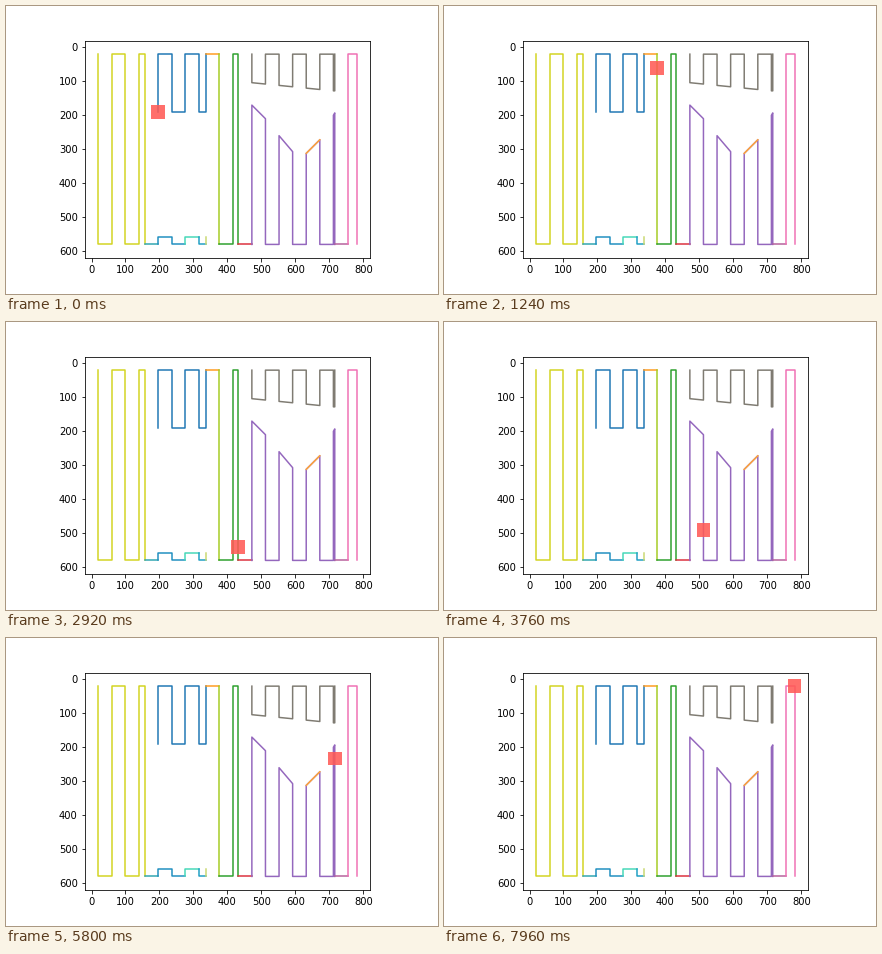
These frames come from a looping animation (432x288 px, 8 s). A matplotlib script:

```python
import math

import matplotlib.pyplot as plt
from matplotlib.animation import FuncAnimation
from matplotlib.patches import Rectangle

TOP, BOTTOM = 20, 580
STEP = 40      # largest move per frame along either axis
SIZE = 40      # side of the robot
FRAMES, INTERVAL = 200, 40


def zigzag(xs, start, end):
    """Vertical sweeps at each x, alternating between two heights."""
    pts = []
    for i, x in enumerate(xs):
        a, b = (start, end) if i % 2 == 0 else (end, start)
        pts += [(x, a), (x, b)]
    return pts


def walk(points):
    """Split every leg into steps; the last step of a leg may be shorter."""
    out = [points[0]]
    for (x0, y0), (x1, y1) in zip(points, points[1:]):
        span = max(abs(x1 - x0), abs(y1 - y0))
        if span == 0:
            out.append((x1, y1))
        for k in range(1, math.ceil(span / STEP) + 1):
            t = min(1, k * STEP / span)
            out.append((x0 + (x1 - x0) * t, y0 + (y1 - y0) * t))
    return out


left = zigzag([20, 60, 100, 140, 156], TOP, BOTTOM)
upper = zigzag([196, 236, 276, 316, 336], 190, TOP)
lower = zigzag([196, 236, 276, 316, 336], BOTTOM, 557)
middle = zigzag([376, 416, 432], TOP, BOTTOM)
slopes = [(472, BOTTOM), (472, 170), (512, 210), (512, BOTTOM),
          (552, BOTTOM), (552, 260), (592, 307), (592, BOTTOM),
          (632, BOTTOM), (632, 312), (672, 272), (672, BOTTOM),
          (712, BOTTOM), (712, 200), (716, 193), (716, BOTTOM)]
ceiling = [(472, TOP), (472, 104), (512, 108), (512, TOP),
           (552, TOP), (552, 112), (592, 116), (592, TOP),
           (632, TOP), (632, 120), (672, 124), (672, TOP),
           (712, TOP), (712, 128), (716, 128), (716, TOP)]
right = zigzag([756, 780], BOTTOM, TOP)

route = upper + middle + slopes + right + [(780, BOTTOM), (780, TOP)]
spots = walk(route)

lines = [
    (left, "#d3d420"),
    ([left[-1], lower[0]], "#2fa5b0"),
    (lower[:5], "#1f8fc0"),
    (lower[4:7], "#45d8b8"),
    (lower[6:9], "#1f9fc4"),
    (lower[8:], "#c9d870"),
    (upper, "#1f77b4"),
    ([upper[-1], middle[0]], "#ff9a1e"),
    (middle[:2], "#a5cc22"),
    (middle[1:], "#2ca02c"),
    ([middle[-1], slopes[0]], "#dc2f3c"),
    (slopes, "#9467bd"),
    (slopes[9:11], "#ffa53a"),
    ([slopes[-1], right[0]], "#b5609a"),
    (ceiling, "#7f7b72"),
    (right, "#f070b4"),
]

fig, ax = plt.subplots(figsize=(6, 4), dpi=72)
fig.subplots_adjust(left=0.125, right=0.9, bottom=0.125, top=0.88)
ax.set_xlim(-20, 820)
ax.set_ylim(620, -20)
ax.set_aspect("equal")
ax.set_xticks(range(0, 801, 100))
ax.set_yticks(range(0, 601, 100))

for pts, color in lines:
    ax.plot(*zip(*pts), color=color, lw=1.5)

robot = Rectangle((0, 0), SIZE, SIZE, color="#ff5a55", alpha=0.87, lw=0, zorder=3)
ax.add_patch(robot)


def update(i):
    x, y = spots[min(i, len(spots) - 1)]
    robot.set_xy((x - SIZE / 2, y - SIZE / 2))
    return [robot]


anim = FuncAnimation(fig, update, frames=FRAMES, interval=INTERVAL,
                     init_func=lambda: update(0), repeat=True, repeat_delay=0)
plt.show()
```
